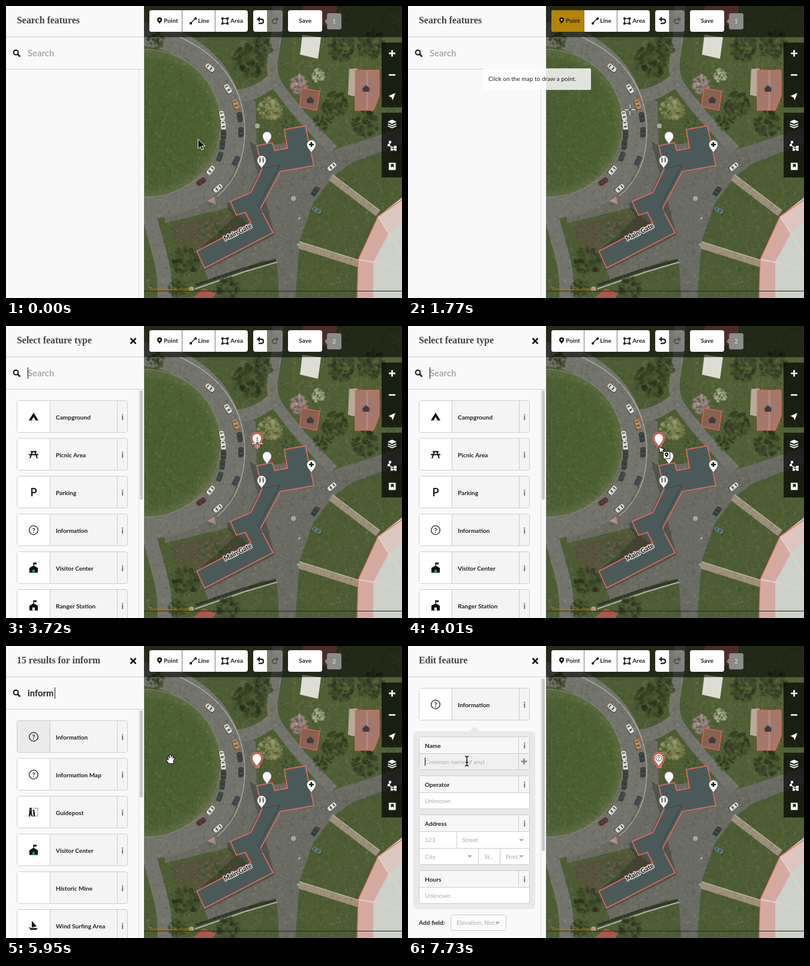
An HTML page with a canvas that plays this animation: 660x487 px, repeating every 8000 ms.

```html
<!DOCTYPE html>
<html lang="en">
<head>
<meta charset="utf-8">
<title>Map editor: adding a point</title>
<style>
html, body { margin: 0; width: 100%; height: 100%; overflow: hidden; background: #4b5930; }
canvas, body > svg { position: absolute; left: 0; top: 0; }
text { font-family: Lato, sans-serif; font-size: 10.15px; fill: #222; white-space: pre; }
.b { font-weight: bold; }
.title { font: bold 15.9px "Liberation Serif", serif; fill: #444; }
.query { font-size: 14.8px; font-weight: bold; }
.faint { fill: #aaa; }
.mid { text-anchor: middle; }
</style>
</head>
<body>
<canvas id="map" width="660" height="487"></canvas>
<svg id="ui" width="660" height="487"></svg>
<script>
const LOOP = 8000, TICK = 148.7;

// ---------- aerial map ----------
const ctx = document.getElementById('map').getContext('2d');
let seed = 7;
const rnd = () => (seed = (seed * 16807) % 2147483647) / 2147483647;

function shape(d, fill, stroke, width = 1) {
  const p = new Path2D(d);
  if (fill) { ctx.fillStyle = fill; ctx.fill(p); }
  if (stroke) { ctx.strokeStyle = stroke; ctx.lineWidth = width; ctx.stroke(p); }
}
function tree(x, y, r, h, s, l) {
  for (let i = 0; i < r * 5; i++) {
    const a = rnd() * 6.283, q = r * Math.sqrt(rnd());
    ctx.fillStyle = `hsla(${h},${s}%,${l + (rnd() - .5) * 14}%,.6)`;
    ctx.beginPath();
    ctx.arc(x + q * Math.cos(a), y + q * Math.sin(a), 1 + rnd() * r * .14, 0, 7);
    ctx.fill();
  }
}
function car(x, y, deg, color) {
  ctx.save();
  ctx.translate(x, y);
  ctx.rotate(deg * Math.PI / 180);
  ctx.fillStyle = 'rgba(20,22,18,.45)';
  ctx.fillRect(-7, -3, 16, 8);
  ctx.fillStyle = color;
  ctx.beginPath();
  ctx.roundRect(-8, -4, 16, 8, 3);
  ctx.fill();
  ctx.fillStyle = '#4a5050';
  ctx.fillRect(1, -2.5, 2.5, 5);
  ctx.fillRect(-5.5, -2.5, 2, 5);
  ctx.restore();
}

function drawMap() {
  const road = '#73746c', coral = '#ea6a5e';
  const lawn = ctx.createRadialGradient(235, 195, 40, 235, 195, 128);
  lawn.addColorStop(0, '#495e30');
  lawn.addColorStop(.75, '#4c6032');
  lawn.addColorStop(1, '#66704a');
  shape('M230 0H660V487H230Z', '#4d5c33');
  shape('M480 52H660V200L545 238L470 140Z', '#505f35');
  shape('M395 145L416 160L418 235L515 222L545 240L660 203V230L575 262L545 285L512 328L490 390L482 487H455L452 430L430 424L338 458L322 420L405 364L372 336L266 362L262 345L385 270Z', '#6a6b63');
  shape('M225 46C310 52 378 118 378 204C378 282 310 340 225 334', null, road, 40);
  shape('M230 72C300 72 358 127 358 196C358 264 305 319 230 319Z', lawn, '#8b8d80');
  shape('M236 330C242 385 268 420 264 490', null, road, 24);
  shape('M453 0C455 75 432 95 452 132C475 165 505 200 545 240', null, road, 18);
  shape('M385 150Q420 148 448 120', null, road, 22);
  shape('M290 52C370 88 398 150 398 208C398 258 380 294 352 317', null, '#aaa99e', 1.5);
  shape('M275 368L350 346L382 352L403 364L318 408L288 414Z', '#55533a');
  shape('M541 286L620 346M488 399L590 431', null, '#9c8f7b', 11);
  shape('M544 281L623 341M489 393L591 425', null, '#c0b5a5', 1.5);
  shape('M450 424L395 439L315 466', null, '#33382a', 5);
  shape('M452 427L395 444L315 472', null, '#b3b1a5', 2);
  shape('M335 325L347 318L350 331Z', '#a89285');
  for (let i = 0; i < 9000; i++) {
    ctx.fillStyle = rnd() < .5 ? 'rgba(15,20,5,.06)' : 'rgba(220,220,180,.055)';
    ctx.fillRect(230 + rnd() * 430, rnd() * 487, 1 + rnd() * 4, 1 + rnd() * 4);
  }

  [[405, 92, 27], [425, 70, 18], [560, 70, 22], [548, 165, 21], [598, 195, 22], [610, 65, 24],
   [298, 424, 25], [370, 470, 18], [285, 470, 15], [250, 58, 14], [528, 192, 15]]
    .forEach(([x, y, r]) => tree(x, y, r, 82, 27, 20));
  tree(440, 172, 20, 62, 20, 45);
  tree(487, 130, 15, 350, 14, 60);
  tree(521, 116, 11, 65, 14, 62);
  tree(340, 375, 22, 75, 20, 28);
  tree(470, 192, 13, 82, 27, 26);

  shape('M495 0H552L546 34L492 28Z', '#a66356');
  shape('M494 48L525 52L520 88L490 81Z', '#dedcd5');
  shape('M572 105L586 104L581 151L570 148Z', '#b7aa9b');
  shape('M582 107H622V150L612 174H582Z', '#a4786c', coral, 1.2);
  shape('M602 108V173', null, '#b78a7e', 3);
  shape('M493 137L523 142L518 174L489 168Z', '#8a6151', coral, 1.2);
  shape('M310 487L330 471L350 480L345 487Z', '#a9584b');
  shape('M585 490L587 423L620 351L662 318V490Z', '#d4aaa0');
  shape('M620 351L662 318V360L638 379Z', '#dcc6be');
  shape('M612 490V427L638 379L662 358V490Z', '#ccd2ca');
  shape('M587 423L612 427M620 351L638 379M638 379L662 420M612 427L662 440', null, '#e4d0c9', 2);
  shape('M585 490L587 423L620 351L662 322', null, coral, 1.3);

  shape('M405 225L418 233L426 270L405 311L366 330L380 353L318 409L330 442L448 382Z', 'rgba(25,30,24,.3)');
  shape('M418 233L444 228L448 241L469 237L464 206L499 200L513 266L457 276L424 338L445 378L331 437L318 409L408 362L399 344L384 349L374 326L408 311L427 272Z', '#4a5a59', coral, 1.7);
  shape('M457 265L420 334L428 345M457 265L427 271', null, '#3a4744', 1.2);

  const pale = '#dcdcd5', dark = '#353c3e';
  [[340, 103, 40, pale], [370, 138, 58, pale], [383, 164, 72, '#c98a4e'], [390, 185, 82, dark],
   [392, 210, 90, dark], [360, 183, 80, pale], [362, 199, 85, pale], [363, 214, 90, dark],
   [361, 231, 95, dark], [357, 251, 108, '#3d4646'], [341, 274, 130, pale], [326, 293, 145, '#5b2d2a'],
   [353, 304, 140, pale], [384, 258, 115, '#39474f'], [543, 268, 140, pale], [516, 309, 125, dark],
   [518, 341, 30, '#567a77']].forEach(c => car(...c));
  [[479, 321, 4], [419, 200, 4], [309, 472, 4], [489, 354, 2], [487, 398, 2]].forEach(([x, y, r]) => {
    ctx.fillStyle = '#a9aba0';
    ctx.beginPath();
    ctx.arc(x, y, r, 0, 7);
    ctx.fill();
  });
}

// ---------- SVG helpers ----------
const rect = (x, y, w, h, fill, more = '') => `<rect x="${x}" y="${y}" width="${w}" height="${h}" fill="${fill}" ${more}/>`;
const path = (d, fill = '#111', more = '') => `<path d="${d}" fill="${fill}" ${more}/>`;
const line = (d, color = '#ccc', w = 1) => path(d, 'none', `stroke="${color}" stroke-width="${w}"`);
const text = (x, y, s, cls = '', more = '') => `<text x="${x}" y="${y}" class="${cls}" ${more}>${s}</text>`;
const move = (x, y, s) => `<g transform="translate(${x} ${y})">${s}</g>`;
const clamp = v => Math.max(0, Math.min(1, v));

// Position at tick k along [tick, x, y] stops.
function along(k, stops) {
  let a = stops[0];
  for (const b of stops) {
    if (k < b[0]) {
      const p = clamp((k - a[0]) / (b[0] - a[0]));
      return [a[1] + (b[1] - a[1]) * p, a[2] + (b[2] - a[2]) * p];
    }
    a = b;
  }
  return [a[1], a[2]];
}

const station = door => path('M-7 8V0L0-4L7 0V8Z M-.7-4V-9H5V-6H.7V-4Z') + rect(-2, 3, 4, 5, door);
const icons = {
  tent: path('M-8 6L0-7L8 6Z') + path('M-3.500 6L0 0L3.500 6Z', '#fff'),
  picnic: line('M-5-5H5M-8 0H8M-2-5L-6 6M2-5L6 6', '#111', 2),
  parking: text(0, 6, 'P', 'b mid', 'style="font-size:18px"'),
  info: '<circle r="7.3" fill="none" stroke="#222" stroke-width="1.3"/>' + text(0, 4, '?', 'b mid', 'style="font-size:11px"'),
  visitor: station('#2a9a4a'),
  ranger: station('#fff'),
  guide: '<circle cx="-5" cy="-6" r="2"/><circle cx="0" cy="-3" r="1.5"/>' +
    path('M-7-4H-3V2L-1 7H-3L-5 3L-6 7H-8Z M-1-1H2V7H0Z') +
    path('M-1-7H7V6H3', 'none', 'stroke="#222" stroke-dasharray="1.500 1.500"'),
  none: '',
  surf: path('M-3 3V-8L5 1Z M-8 2L-4 4H7L4 7H-5Z'),
  house: path('M-6-1L0-6L6-1L5 5H-5Z', '#3b3f42'),
};

const presets = [['Campground', 'tent'], ['Picnic Area', 'picnic'], ['Parking', 'parking'],
  ['Information', 'info'], ['Visitor Center', 'visitor'], ['Ranger Station', 'ranger']];
const matches = [['Information', 'info'], ['Information Map', 'info'], ['Guidepost', 'guide'],
  ['Visitor Center', 'visitor'], ['Historic Mine', 'none'], ['Wind Surfing Area', 'surf']];

// ---------- side panel ----------
const infoMark = y => rect(193.2, y - 5, 2, 2, '#777') + rect(193.2, y - 2, 2, 7, '#777');
const closeMark = line('M207.500 20.500L216.500 29.500M216.500 20.500L207.500 29.500', '#111', 2.5);
const head = title => rect(0, 0, 230, 487, '#f9f9f9') + text(18, 29, title, 'title') + line('M0 51.500H230');
const scroll = (y, h) => line(`M221.500 ${y}V487`, '#ddd') + (h ? rect(223, y + 1, 5, h, '#c8c8c8', 'rx="2.500"') : '');

function presetRow(y, [name, icon], hot) {
  return rect(18.5, y + .5, 184, 53, '#f4f4f4', 'rx="3" stroke="#ccc"') +
    rect(19, y + 1, 54, 52, hot ? '#ebebeb' : '#fff') +
    line(`M73.500 ${y}V${y + 54}M185.500 ${y}V${y + 54}`) +
    move(46, y + 27.5, icons[icon]) + text(83, y + 32, name, 'b') + infoMark(y + 28);
}
function searchPane(title, query, rows, thumb, caret) {
  const caretX = 36.5 + [0, 4, 12, 18, 26, 32, 45][query.length];
  return head(title) + line('M0 105.500H230') +
    '<circle cx="16.500" cy="77.500" r="3.800" fill="none" stroke="#222" stroke-width="2.200"/>' +
    line('M19.500 80.500L23.500 84.500', '#222', 2.8) +
    text(36, 84, query || 'Search', query ? 'query' : 'query faint') +
    (caret ? line(`M${caretX} 69V88`, '#111') : '') +
    (rows.length ? closeMark : '') + scroll(106, thumb) +
    rows.map((r, i) => presetRow(124 + 63 * i, r, query && !i)).join('');
}
function field(y, label, h = 55) {
  return rect(18.5, y - .5, 184, h, '#fff', 'rx="3" stroke="#ccc"') + rect(19, y, 183, 27, '#f6f6f6') +
    line(`M18 ${y + 27.5}H203M184.500 ${y}V${y + 27}`) + text(28, y + 18, label, 'b') + infoMark(y + 14);
}
const drop = (x, y) => path(`M${x - 4} ${y - 2}h8l-4 4z`, '#aaa');
const hint = (x, y, s) => text(x, y, s, 'faint');

function editPane(focus, caret) {
  return head('Edit feature') + closeMark + scroll(53, 288) + presetRow(70, presets[3]) +
    path('M103 142L111 134L119 142Z', '#e9e9e9') + rect(9, 142, 203, 297, '#e9e9e9', 'rx="8"') +
    field(152, 'Name') + rect(19, 180, 183, 26, focus ? '#f0f0f0' : '#fff') +
    line('M184.500 180V207') + line('M188.500 192.500H198.500M193.500 187.500V197.500', '#888', 2.5) +
    hint(28, 197, 'Common name (if any)') + (caret ? line('M28.500 186V200', '#111') : '') +
    field(217, 'Operator') + hint(28, 262, 'Unknown') +
    field(282, 'Address', 83) + line('M18 337.500H203M81.500 310V337M117.500 338V365M153.500 338V365') +
    hint(28, 327, '123') + hint(90, 327, 'Street') + drop(189, 324) +
    hint(28, 355, 'City') + drop(103, 351) + hint(127, 355, 'St..') + hint(163, 355, 'Post..') + drop(189, 351) +
    field(375, 'Hours') + hint(28, 420, 'Unknown') +
    text(18, 465, 'Add field:', 'b') + rect(71.5, 448.5, 92, 26, '#fbfbfb', 'rx="3" stroke="#ccc"') +
    hint(81, 465, 'Elevation, Not..') + drop(149, 462);
}
function sidebar(k) {
  if (k < 25) return searchPane('Search features', '', [], 0, false);
  const typed = 'inform'.slice(0, [0, 1, 2, 3, 5, 6][Math.max(0, Math.min(5, k - 31))]);
  const caret = k < 29 || (k > 31 && k < 42);
  const count = typed.length < 3 ? 50 : 15;
  const list = typed ? searchPane(`${count} results for ${typed}`, typed, matches, 146, caret)
    : searchPane('Select feature type', '', presets, 183, caret);
  const slide = k < 45 ? 0 : [.2, .7, 1][Math.min(2, k - 45)];
  if (!slide) return list;
  const edit = editPane(k > 48, k > 50);
  return slide < 1 ? move(-230 * slide, 0, list) + move(230 * (1 - slide), 0, edit) : edit;
}

// ---------- map overlay and controls ----------
const pinShape = 'M0 14C-2 9-7.500 6-7.500 0A7.500 7.500 0 1 1 7.500 0C7.500 6 2 9 0 14Z';
const pin = (x, y, icon = '') => move(x, y, path(pinShape, '#fff', 'stroke="#444" stroke-width=".7"') + icon);
const tinyPin = path('M0 5C-1 2-4 1-4-2A4 4 0 1 1 4-2C4 1 1 2 0 5Z') + '<circle cy="-2" r="1.500" fill="#fff"/>';
const people = line('M0-4.500V4.500', '#888', .6) + '<circle cx="-2.700" cy="-3.200" r="1"/><circle cx="2.700" cy="-3.200" r="1"/>' +
  line('M-2.700-1.500V4M2.700-1.500V4', '#222', 1.3) + line('M-4.300-.5H-1.100M1.100-.5H4.300', '#222', .9);

const overlay = move(600, 138, icons.house) + move(507, 157, icons.house) +
  text(0, 4, 'Main Gate', 'b mid', 'transform="translate(386 377) rotate(-27)" style="font-size:11px" stroke="#d2d4ce" stroke-width="3" paint-order="stroke" stroke-linejoin="round"') +
  pin(435, 217) + pin(509, 231, line('M-4 0H4M0-4V4', '#111', 2.6)) + pin(426, 257, people) +
  text(239, 476, 'Terms &amp; Feedback', '', 'style="font-size:9px;fill:#b07c10"') +
  text(618, 476, 'park-tiles-n', '', 'style="font-size:9px;fill:#c4c4bc"') + line('M230 475.500H660', '#24261f');

const controls = rect(626, 61, 34, 108, '#000', 'opacity=".68"') + rect(626, 178, 34, 108, '#000', 'opacity=".68"') +
  line('M638 79H649M643.500 73.500V84.500M638 115H649', '#fff', 2.6) +
  path('M649 145L644.500 157L642.500 152.500L637.500 150Z', '#fff') +
  path('M643.500 189.500L651 193L643.500 196.500L636 193Z', '#fff') +
  line('M636.500 196.500L643.500 199.500L650.500 196.500M636.500 200L643.500 203L650.500 200', '#fff', 1.8) +
  line('M640 227L638.500 232L643 235.500H648V239H642V235.500', '#fff', 1.3) +
  path('M638 225h4v4h-4zM636 230h4v4h-4zM647 233h4v4h-4zM647 237.500h4v4h-4zM641 237.500h4v4h-4z', '#fff') +
  path('M638 261.500H649.500V273.500H638Z', '#fff') + path('M641.500 263.500H646.500V269.500L644 267.500L641.500 269.500Z', '#222');

function toolbar(k) {
  const pointFill = k < 5 || k >= 25 ? '#fff' : k < 10 ? '#e6e6e6' : '#b68407';
  return rect(230, 0, 430, 52, '#000', 'opacity=".55"') +
    rect(239, 7, 164, 36, '#fff', 'rx="4"') + path('M243 7H293V43H243Q239 43 239 39V11Q239 7 243 7Z', pointFill) +
    line('M293.500 7V43M348.500 7V43', '#777') +
    move(256, 25, tinyPin) + text(263, 28, 'Point', 'b') +
    line('M308 28.500L315 21.500', '#222', 1.6) + '<circle cx="308" cy="29" r="2"/><circle cx="316" cy="21" r="2"/>' + text(320, 28, 'Line', 'b') +
    line('M361 21H369V29H361Z', '#222', 1.5) + path('M359 19h3.500v3.500h-3.500zM367.500 19h3.500v3.500h-3.500zM359 27.500h3.500v3.500h-3.500zM367.500 27.500h3.500v3.500h-3.500z', '#222') + text(374, 28, 'Area', 'b') +
    path('M416 7H435V43H416Q412 43 412 39V11Q412 7 416 7Z', '#fff') +
    path('M435 7H457Q461 7 461 11V39Q461 43 457 43H435Z', '#fff', 'opacity=".38"') +
    line('M421 22H425Q429 22 429 25.500T425 29H421', '#222', 2.3) + path('M423 17.500V26.500L418 22Z', '#222') +
    line('M452 22H448Q444 22 444 25.500T448 29H452', '#555', 2.3) + path('M450 17.500V26.500L455 22Z', '#555') +
    rect(470, 7, 57, 36, '#fff', 'rx="4"') + text(498.5, 28, 'Save', 'b mid') +
    rect(535, 12, 24, 27, '#8b8b88', 'rx="3"') + path('M535 21L531 25.500L535 30Z', '#8b8b88') +
    text(547, 29, k < 25 ? 1 : 2, 'mid', 'style="fill:#eee"');
}

function tooltips(k) {
  if (k >= 5 && k < 11) {
    return `<g opacity="${k === 10 ? .5 : clamp((k - 4) / 3)}">` +
      rect(230, 61, 180, 72, '#fff', 'opacity=".82"') + rect(230, 133, 180, 36, '#ececec', 'opacity=".82"') +
      ['Add visitor centers, entrance', 'stations, picnic areas, or other', 'points of interest to the map.']
        .map((s, i) => text(320, 82 + 18 * i, s, 'mid')).join('') +
      text(320, 154, 'Shortcut: <tspan class="b">1</tspan>', 'mid') + '</g>';
  }
  if (k < 11 || k >= 25) return '';
  const [x, y] = along(k, [[11, 125, 62], [12, 125, 104], [13, 170, 168], [16, 217, 192], [17, 217, 192], [19, 217, 183]]);
  return rect(x, y, 180, 36, '#fff', 'opacity=".83" rx="2"') +
    (k > 13 ? path(`M${x + 181} ${y + 12.5}l5 5l-5 5z`, '#fff', 'opacity=".8"') : '') +
    text(x + 9, y + 21, 'Click on the map to draw a point.');
}

// ---------- pointer ----------
const inked = 'stroke="#111" stroke-width="1.100" stroke-linejoin="round"';
const cursors = {
  arrow: path('M0 0V16L4 12.500L6.500 18L9 17L6.500 11.500H12Z', '#111', 'stroke="#fff"'),
  hand: path('M-2 1.500a1.800 1.800 0 0 1 3.600 0V6l5 1q2 .5 2 2.500v2l-1.500 4H-2L-6 9.500q-.5-2 1.500-1.500l2.500 1.500Z', '#fff', inked) +
    line('M2 6V9M4.700 7V9.500', '#111'),
  grab: path('M-4 8L-8 2q0-2 2-1l1.500 1-1.500-6q1-2 2.200 0l1 3V-6q1.500-2 3 0v3.500l1-3q2-1 2 1v4l1-2q2-1 2 1l-2 6v3.500Z', '#fff', inked),
  cross: line('M-10 0H10M0-10V10', '#555', 2.6) + line('M-9 0H-2M2 0H9M0-9V-2M0 2V9', '#eee', 1.3),
  select: path('M0 0L2 11L4.500 8.500L8 12L10 10L6.500 6.500L10 5Z', '#fff', inked) +
    rect(7.5, 8.5, 11, 12, '#fff', 'stroke="#222"') + move(13, 14.5, `<g transform="scale(.75)">${tinyPin}</g>`),
  beam: line('M-3-8Q0-8 0-6V6Q0 8-3 8M3-8Q0-8 0-6M0 6Q0 8 3 8M-2 2H2', '#111', 1.4),
};
function pointer(k) {
  const kind = k < 5 ? 'arrow' : k < 11 ? 'hand' : k < 26 ? 'cross' : k < 40 ? 'select'
    : k < 41 ? 'grab' : k < 49 ? 'hand' : k < 51 ? 'arrow' : 'beam';
  const [x, y] = along(k, [[1, 320, 222], [3, 298, 140], [5, 268, 45], [7, 264, 33], [10, 264, 33],
    [11, 325, 95], [12, 370, 173], [13, 395, 190], [15, 414, 202], [17, 419, 205], [19, 419, 196], [25, 419, 196],
    [26, 418, 201], [39, 418, 201], [40, 275, 188], [41, 208, 172], [43, 138, 158], [48, 138, 158], [52, 98, 192]]);
  return move(x, y, cursors[kind]);
}

function scene(k) {
  const added = k < 25 ? '' :
    move(418, 187, path(pinShape, '#e8604f', 'stroke="#e8604f" stroke-width="6" stroke-linejoin="round" opacity=".9"')) +
    pin(418, 187, k < 45 ? '' : `<g transform="scale(.68)">${icons.info}</g>`);
  return overlay + added + toolbar(k) + controls +
    `<svg width="230" height="487">${sidebar(k)}</svg>` + tooltips(k) + pointer(k);
}

const ui = document.getElementById('ui');
const start = performance.now();
let shown = -1;
function frame() {
  const k = Math.floor(((performance.now() - start) % LOOP + 15) / TICK);
  if (k !== shown) ui.innerHTML = scene(shown = k);
  requestAnimationFrame(frame);
}
drawMap();
frame();
</script>
</body>
</html>
```
